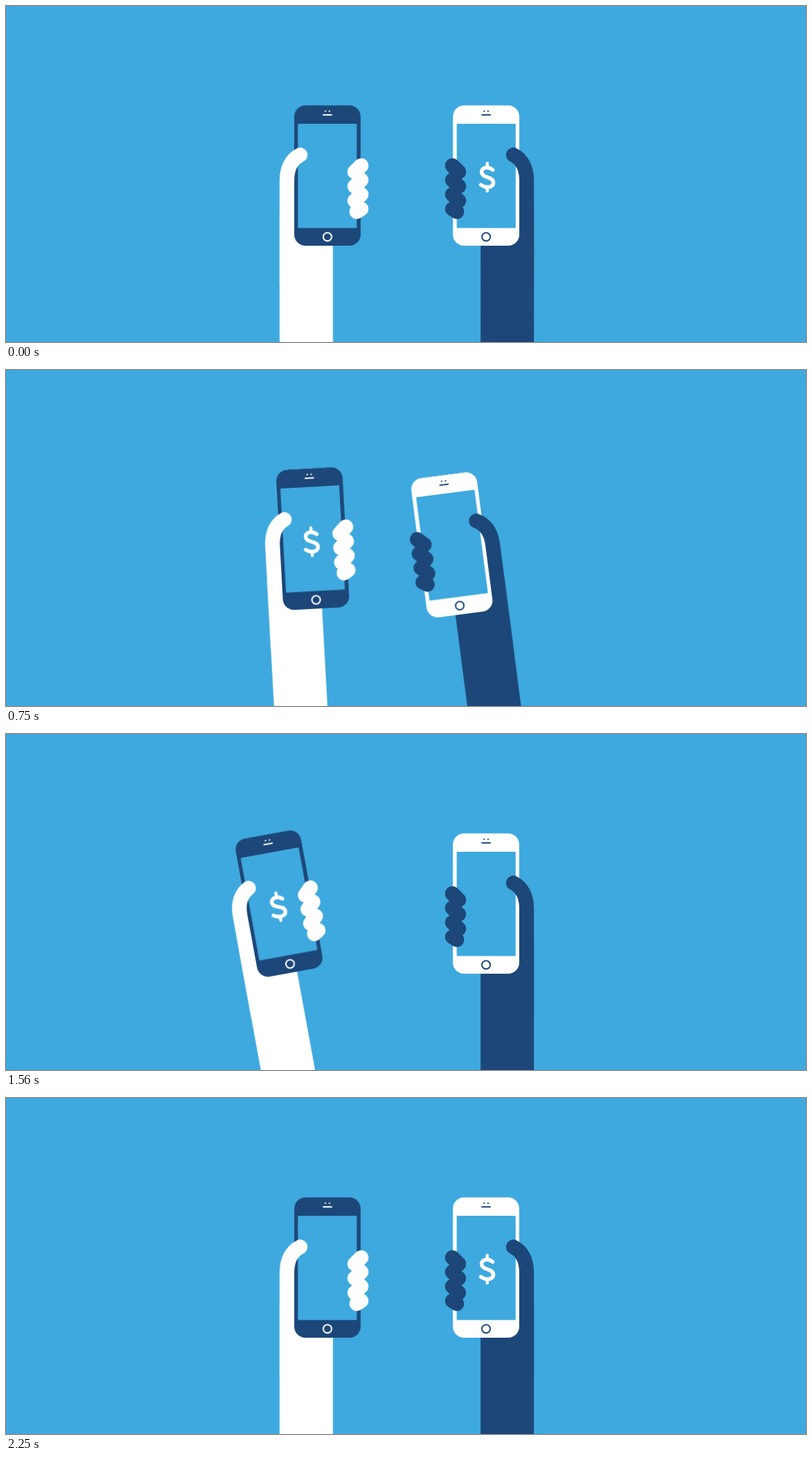
These frames come from a looping animation (1155x485 px, 2.7 s). An HTML page without scripts:

```html
<!DOCTYPE html>
<html lang="en">
<head>
<meta charset="utf-8">
<title>Phone to phone payment</title>
<style>
  html, body { margin: 0; width: 100%; height: 100%; overflow: hidden; background: #3ea9de; }
  svg { display: block; width: 100%; height: 100%; }

  .right { --delay: 0s; color: #1d4779; fill: #fff; }
  .left { --delay: -1.35s; color: #fff; fill: #1d4779; }

  .swing, .held, .fly, .flip { animation: 2.7s linear var(--delay) infinite; }
  .swing { animation-name: swing; transform-origin: 727.6px 630px; }
  .held { animation-name: held; animation-timing-function: step-end; }
  .flip { animation-name: flip; animation-timing-function: step-end; }
  .fly { animation-name: fly; }

  /* wind up, throw, settle; later recoil from the catch */
  @keyframes swing {
    0% { transform: rotate(0deg); animation-timing-function: cubic-bezier(.3, .1, .35, 1); }
    15.556% { transform: rotate(13.95deg); animation-timing-function: cubic-bezier(.6, 0, .8, .52); }
    20% { transform: rotate(10.9deg); animation-timing-function: cubic-bezier(.4, .12, .65, 1); }
    23.704% { transform: rotate(-13deg); animation-timing-function: cubic-bezier(.4, 0, .7, .41); }
    27.222% { transform: rotate(-8.8deg); animation-timing-function: cubic-bezier(.3, .49, .6, 1); }
    33.333% { transform: rotate(0deg); }
    70.185% { transform: rotate(0deg); animation-timing-function: cubic-bezier(.2, .6, .5, 1); }
    74.444% { transform: rotate(4.6deg); animation-timing-function: cubic-bezier(.37, 0, .63, 1); }
    83.333%, 100% { transform: rotate(0deg); }
  }
  @keyframes held {
    0%, 70.185%, 100% { opacity: 1; }
    16.85% { opacity: 0; }
  }
  @keyframes flip {
    0%, 20.185%, 100% { opacity: 0; }
    16.85% { opacity: 1; }
  }
  @keyframes fly {
    0%, 16.667% { transform: translate(787px, 250px) rotate(13.8deg); }
    20.185%, 100% { transform: translate(462.3px, 249px) rotate(0deg); }
  }
</style>
</head>
<body>
<svg viewBox="0 0 1155 485" preserveAspectRatio="none">
  <defs>
    <g id="hand">
      <rect x="685.2" y="300" width="77" height="500" fill="currentColor"/>
      <rect x="645.2" y="143.5" width="95.8" height="202.5" rx="16"/>
      <rect x="650.7" y="170" width="85.1" height="150.5" rx="1" fill="#3ea9de"/>
      <g fill="none" stroke="currentColor" stroke-width="2">
        <circle cx="693.1" cy="333.2" r="6"/>
        <path d="M686.4 157.2h13.4"/>
      </g>
      <g fill="currentColor">
        <circle cx="690.3" cy="151.9" r="1.1"/>
        <circle cx="696" cy="151.9" r="1.1"/>
      </g>
      <g fill="none" stroke="currentColor" stroke-width="21.2" stroke-linecap="round">
        <path d="M732.4 215C744.7 221 751.6 234 751.6 252V400"/>
        <path d="M644.4 230.4l9.3 9.2M644.4 251.2l9.3 9.2M644.4 272l9.3 9.2M644.4 292.8l6.4 4"/>
      </g>
    </g>
    <g id="dollar" fill="none" stroke="#fff" stroke-linecap="round">
      <path stroke-width="5.4" d="M7.8-10.4C5.2-12.7 2.6-13.7-.4-13.7C-5.3-13.7-8.2-11-8.2-7.5C-8.2-2.8-4.2-1.2 .2 .2C5 1.8 8.8 3.4 8.8 8C8.8 12 5.2 14.5 .2 14.5C-3.6 14.5-6.6 13.2-9.2 11"/>
      <path stroke-width="4.4" d="M0-20v5M0 15v5"/>
    </g>
  </defs>

  <g class="left" transform="matrix(-1 0 0 1 1157.2 0)">
    <g class="swing">
      <use href="#hand"/>
      <g class="held"><use href="#dollar" transform="translate(694.9 249) scale(-1 1)"/></g>
    </g>
  </g>
  <g class="right">
    <g class="swing">
      <use href="#hand"/>
      <g class="held"><use href="#dollar" transform="translate(694.8 247)"/></g>
    </g>
  </g>

  <g class="right">
    <g class="flip"><g class="fly"><use href="#dollar"/></g></g>
  </g>
  <g class="left" transform="matrix(-1 0 0 1 1157.2 0)">
    <g class="flip"><g class="fly"><use href="#dollar" transform="scale(-1 1)"/></g></g>
  </g>
</svg>
</body>
</html>
```
